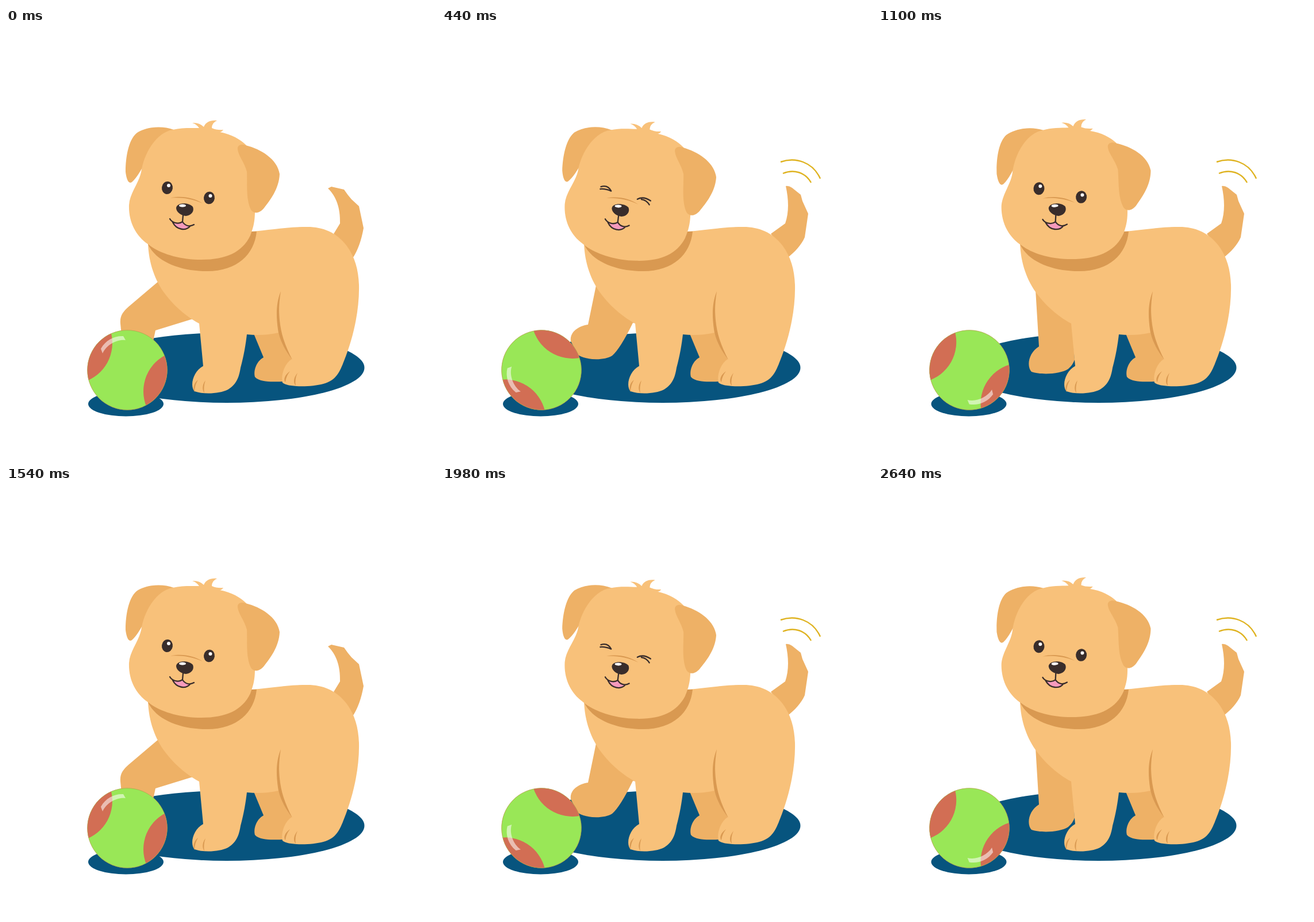
These frames come from a looping animation (748x748 px, 3080 ms). An HTML page:

```html
<!DOCTYPE html>
<html lang="en">
<head>
<meta charset="utf-8">
<title>Puppy with a ball</title>
<style>
  html, body { margin: 0; width: 100%; height: 100%; overflow: hidden; background: #fff; }
  svg { display: block; width: 100%; height: 100%; }
  .fur { fill: #f8c17a; }
  .shade { fill: #eeb166; }
  .dark { fill: #d99951; }
  .floor { fill: #07547e; }
  .ink { fill: #392d2b; }
  .line { fill: none; stroke: #392d2b; stroke-width: 2.3; stroke-linecap: round; stroke-linejoin: round; }
  .wag { fill: none; stroke-width: 2.4; }
  .patch { fill: #d26e54; }
</style>
</head>
<body>
<svg viewBox="0 0 748 748">
  <defs><clipPath id="round"><circle r="69.5"/></clipPath></defs>

  <ellipse class="floor" cx="384" cy="591" rx="239.5" ry="61"/>
  <ellipse class="floor" id="ballShadow" cy="654" rx="65.5" ry="21.5"/>

  <path class="shade" id="tail"/>
  <path class="wag" id="wag"/>
  <path class="shade" id="leg"/>
  <path class="shade" d="M431 532L448 573C435 580 430 597 433 607C443 618 470 615 484 615L499 577L474 529Z"/>

  <path class="fur" d="M247 374C248 405 257 435 274 459C292 484 315 503 336 514L343 588C326 597 319 622 328 632C345 638 372 636 386 629C403 619 406 603 408 591C414 569 417 550 419 533Q448 536 474 530C478 548 488 564 497 576C483 585 478 606 481 617C490 625 530 625 552 619C575 613 581 597 588 579C605 537 615 489 614 447C613 420 607 398 592 378C575 356 552 346 524 346C488 346 456 352 427 354Z"/>
  <path class="dark" d="M478 458C470 478 469 500 474 530C478 548 488 564 498 577C482 545 476 525 475 492Q475 476 478 458Z"/>
  <path class="dark" d="M334 612C326 618 325 628 328 633Q328 622 334 612M347 613C340 622 342 631 345 635Q343 624 347 613M494 597C485 603 482 612 486 616Q487 606 494 597M507 600C499 610 500 618 504 622Q502 611 507 600Z"/>
  <path class="dark" d="M246 374C260 407 304 423 350 423C402 423 432 394 436 354L420 354L300 380Z"/>

  <g id="head">
    <path class="shade" d="M292 177C270 169 243 172 227 183C213 195 208 225 208 250C210 268 215 271 219 268C226 262 232 252 236 245L262 220Z"/>
    <path class="fur" d="M290 177C306 173 323 174 336 174Q331 167 324 165Q336 164 344 172C348 163 356 160 367 161Q358 165 358 174Q367 178 378 177Q375 181 372 181C393 185 408 194 418 204L433 318C433 340 429 350 425 361C411 390 383 403 340 403C300 403 265 391 247 376C225 361 213 336 214 308C215 286 234 267 236 245C242 215 262 182 290 177Z"/>
    <path class="shade" d="M403 211C402 204 409 201 417 204C444 211 472 228 476 254C475 280 459 300 449 313C440 324 430 323 426 316C417 298 420 272 419 250C415 234 404 222 403 211Z"/>
    <path class="dark" d="M286 295.500C305 291 327 295 342 305C324 297 305 294 286 295.500Z"/>

    <g id="openEyes">
      <ellipse class="ink" cx="280.500" cy="278" rx="9.500" ry="11" transform="rotate(8 280.500 278)"/>
      <ellipse class="ink" cx="353.500" cy="295.500" rx="9.500" ry="10.800" transform="rotate(8 353.500 295.500)"/>
      <g fill="#fff"><circle cx="283" cy="274" r="3"/><circle cx="355.500" cy="292" r="3"/></g>
    </g>
    <path class="line" id="shutEyes" d="M276 276Q288 272 294 283M275 280Q284 279 294 283M340 296Q350 290 363 298M347 296Q356 297 361 305"/>

    <path fill="#f59abd" d="M290 339Q298 341 307 337Q313 345 320 344C314 352 297 352 290 339Z"/>
    <path class="line" d="M308 326L307 337C300 342 289 339 285 332M307 337C312 345 320 346 327 342M290 338C297 352 313 353 320 345"/>
    <path class="ink" d="M296 313C297 303 318 303 325 311C328 318 323 326 313 327C304 326 296 320 296 313Z"/>
    <ellipse cx="307" cy="309" rx="6" ry="2.500" fill="#fff"/>
  </g>

  <g id="ball">
    <circle r="69.500" fill="#99e757"/>
    <g clip-path="url(#round)">
      <circle class="patch" cx="-97" cy="-47" r="71"/>
      <circle class="patch" cx="99" cy="37" r="71"/>
    </g>
    <circle r="69.300" fill="none" stroke="#b99a4d" stroke-width=".7"/>
    <path fill="#fff" opacity=".55" d="M-46 -37C-38 -52 -22 -60 -7 -59L-3 -52C-18 -54 -36 -44 -43 -29Z"/>
  </g>
</svg>
<script>
const el = id => document.getElementById(id);
const set = (id, attrs) => {
  for (const name in attrs) el(id).setAttribute(name, attrs[name]);
};
const show = (id, visible) => set(id, { visibility: visible ? "visible" : "hidden" });

const tails = {
  low: {
    tail: "M570 358L581 340C582 313 574 292 560 279L566 276L588 281Q594 290 601 298L614 310L622 348C618 370 612 386 604 399Z",
    wag: "M602 239C632 238 655 258 660 288M600 259C620 258 636 269 642 289",
    color: "#f2c40c"
  },
  high: {
    tail: "M572 358L597 340C604 320 603 298 598 275Q603 274 609 278L624 290L627 301L637 323L631 364C625 378 613 390 603 398Z",
    wag: "M589 233C615 224 645 233 658 262M593 253C612 245 632 251 642 269",
    color: "#dfb321"
  }
};

const legs = {
  reach: "M266 440L213 485C203 494 198 501 199 514L202 545L256 545L260 526L325 506L340 514L300 465Z",
  push: "M267 444L228 499C211 506 205 517 207 532L235 561C252 566 270 560 281 550L330 508L340 514L300 465Z",
  tap: "M268 448L254 516C235 519 222 530 224 545L237 569C255 579 283 578 296 570Q310 558 332 513L340 514L300 465Z",
  stand: "M274 455L280 554C262 565 258 588 267 598C284 604 318 602 331 593Q339 586 342 577L338 510L300 480Z"
};

const heads = {
  level: "",
  nod: "translate(0 1.3) rotate(1.6 320 292)",
  lift: "rotate(-2.150 313 292)"
};

const poses = [
  { at: 0, x: 211, shadow: 208.5, turn: 0, leg: "reach", head: "level", tail: "low", still: true },
  { at: 220, x: 195.5, shadow: 193.5, turn: -40, leg: "push", head: "level", tail: "low" },
  { at: 440, x: 173, shadow: 171.5, turn: -80, leg: "tap", head: "nod", tail: "high" },
  { at: 660, x: 166.5, shadow: 162, turn: -133, leg: "stand", head: "nod", tail: "low" },
  { at: 880, x: 166.5, shadow: 162, turn: -133, leg: "stand", head: "nod", tail: "high" },
  { at: 1100, x: 159, shadow: 158, turn: -173, leg: "stand", head: "lift", tail: "high" }
];
const CYCLE = 1540;

function render(time) {
  const t = time % CYCLE;
  const pose = poses.findLast(p => p.at <= t);
  const { tail, wag, color } = tails[pose.tail];
  const happy = pose.head === "nod";
  set("ball", { transform: `translate(${pose.x} 595) rotate(${pose.turn})` });
  set("ballShadow", { cx: pose.shadow });
  set("leg", { d: legs[pose.leg] });
  set("head", { transform: heads[pose.head] });
  set("tail", { d: tail });
  set("wag", { d: wag, stroke: color });
  show("wag", !pose.still);
  show("openEyes", !happy);
  show("shutEyes", happy);
}

const start = performance.now();
function tick() {
  render(performance.now() - start);
  requestAnimationFrame(tick);
}
tick();
</script>
</body>
</html>
```
